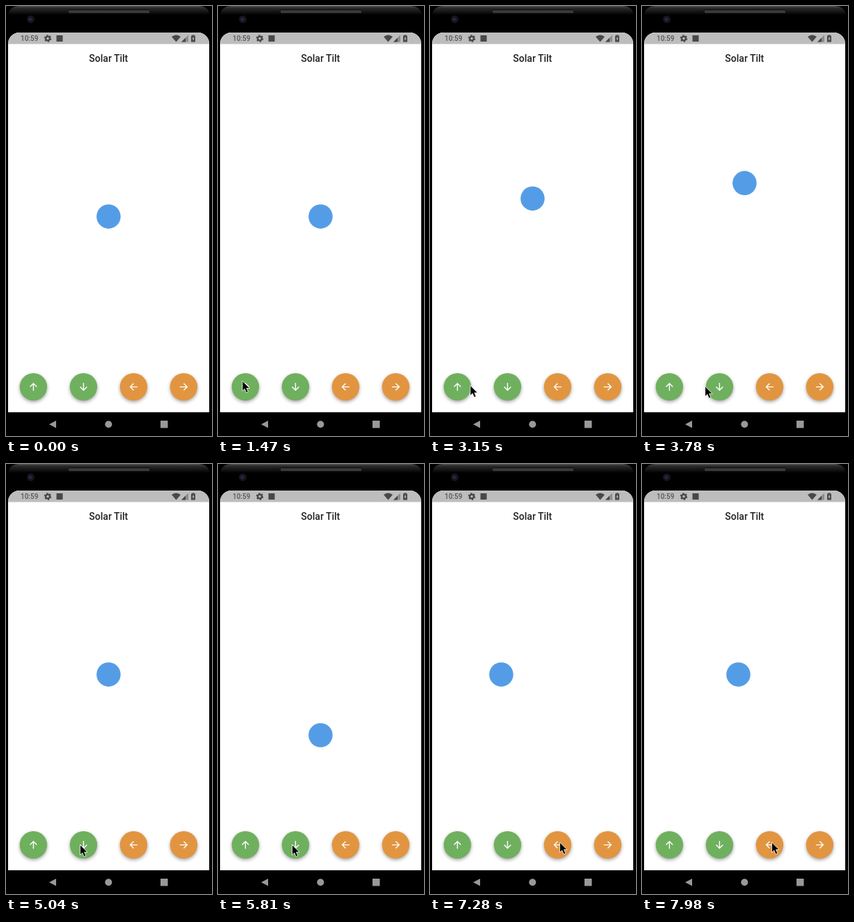
These frames come from a looping animation (296 by 616 pixels, 8000 ms). An HTML page:

```html
<!DOCTYPE html>
<html lang="en">
<head>
<meta charset="utf-8">
<title>Solar Tilt</title>
<style>
  html, body { margin: 0; width: 100%; height: 100%; overflow: hidden; background: #000; }
  svg { display: block; width: 100vw; height: 100vh; }
  text { font-family: Roboto, "Open Sans", sans-serif; font-weight: 500; }
  .fab { filter: drop-shadow(0 2.5px 2.5px rgba(0, 0, 0, .36)); }
</style>
</head>
<body>
<svg viewBox="0 0 296 616">
  <defs>
    <linearGradient id="rim" x2="0" y2="1">
      <stop offset="0" stop-color="#555"/>
      <stop offset=".2" stop-color="#2c2c2c"/>
      <stop offset="1" stop-color="#000"/>
    </linearGradient>
    <clipPath id="screen"><rect x="3" y="38" width="289" height="560" rx="16"/></clipPath>
    <path id="arrow" d="M0 8V-7M-7 0L0-7L7 0" fill="none" stroke="#fff" stroke-width="2"/>
  </defs>

  <!-- phone body -->
  <path d="M3 13Q5 0 20 0H276Q291 0 293 13Z" fill="url(#rim)"/>
  <rect x="89" y="5.5" width="118" height="5" rx="2.5" fill="#3a3a3a" stroke="#0c0c0c"/>
  <circle cx="35.500" cy="19" r="5.500" fill="#15151c"/>
  <circle cx="35" cy="19" r="2.500" fill="#26264a"/>

  <!-- screen -->
  <g clip-path="url(#screen)">
    <rect y="38" width="296" height="544" fill="#fff"/>
    <rect y="38" width="296" height="16.500" fill="#bdbdbd"/>
  </g>
  <text x="21" y="50" font-size="10" fill="#555">10:59</text>
  <g fill="#484848">
    <g fill="none" stroke="#484848">
      <circle cx="60" cy="46.500" r="2.900" stroke-width="2.300"/>
      <circle cx="60" cy="46.500" r="4.500" stroke-width="1.500" stroke-dasharray="2.350"/>
    </g>
    <rect x="72.500" y="42" width="9" height="9"/>
    <path d="M238 44Q244.500 39 251 44L244.500 51.500Z"/>
    <path d="M252 51.500L262 41.500V51.500Z" fill="#8d8d8d"/>
    <path d="M252 51.500L258 45.500V51.500Z"/>
    <path d="M266 42.500H267.500V41.500H270.500V42.500H272V51.500H266Z"/>
    <path d="M269.500 43.500L267.500 47.500H268.800V50L270.600 46.500H269.500Z" fill="#bdbdbd"/>
  </g>
  <text x="147.300" y="80" font-size="14" text-anchor="middle" fill="#222">Solar Tilt</text>

  <g id="fabs"></g>
  <circle id="ball" r="17.300" fill="#549de6"/>

  <!-- navigation bar -->
  <g fill="#999">
    <path d="M62 599.300L72 594V604.600Z"/>
    <circle cx="147.300" cy="599.300" r="5"/>
    <rect x="222" y="594" width="10.500" height="10.500"/>
  </g>

  <path id="cursor" d="M0 0V14.500L3.300 11.500L5.600 17L8.300 15.800L6 10.500H10.500Z"
        stroke="#fff" stroke-width=".8"/>
</svg>
<script>
const $ = id => document.getElementById(id);
const LOOP = 8000, STEP = 70, LEG = 500, REACH = 127;
const HOME = { x: 147.4, y: 301.6 };

// Buttons: up, down, left, right
$('fabs').innerHTML = [0, 180, -90, 90].map((turn, i) =>
  `<g transform="translate(${39.4 + 72 * i} 545.6)">` +
  `<circle class="fab" r="19.7" fill="${i < 2 ? '#6fb05e' : '#e29540'}"/>` +
  `<use href="#arrow" transform="rotate(${turn}) scale(.7)"/></g>`).join('');

const bounces = [
  { start: 2994, dx: 0, dy: -1 },
  { start: 5115, dx: 0, dy: 1 },
  { start: 7073, dx: -1, dy: 0 }
];

// The pointer glides in from below, then from button to button
const entry = { x: 44, y: 618 };
const glides = [
  { from: 280, to: 1260, x: 35, y: 537 },
  { from: 1680, to: 2450, x: 43, y: 543 },
  { from: 2940, to: 4620, x: 106.5, y: 545.5 },
  { from: 6090, to: 6720, x: 186.5, y: 542 }
];

const clamp = p => Math.min(1, Math.max(0, p));
const easeOut = p => 1 - (1 - p) ** 2;

// Cubic ease-in-out with handles at .42 and .58, solved by Newton's method
function easeInOut(p) {
  let u = p;
  for (let i = 0; i < 5; i++)
    u -= (((.52 * u - .78) * u + 1.26) * u - p) / ((1.56 * u - 1.56) * u + 1.26);
  return u * u * (3 - 2 * u);
}

function ballAt(t) {
  let { x, y } = HOME;
  for (const { start, dx, dy } of bounces) {
    const p = clamp((t - start) / (2 * LEG));
    const d = REACH * easeInOut(1 - Math.abs(2 * p - 1));
    x += dx * d;
    y += dy * d;
  }
  return { x, y };
}

function pointerAt(t) {
  let { x, y } = entry;
  for (const g of glides) {
    const p = easeOut(clamp((t - g.from) / (g.to - g.from)));
    x += (g.x - x) * p;
    y += (g.y - y) * p;
  }
  return { x, y };
}

const place = (id, { x, y }) => $(id).setAttribute('transform', `translate(${x} ${y})`);

function draw(now) {
  const t = Math.floor(now % LOOP / STEP) * STEP;
  place('ball', ballAt(t));
  place('cursor', pointerAt(t));
}

const origin = performance.now();
(function tick() {
  draw(performance.now() - origin);
  requestAnimationFrame(tick);
})();
</script>
</body>
</html>
```
